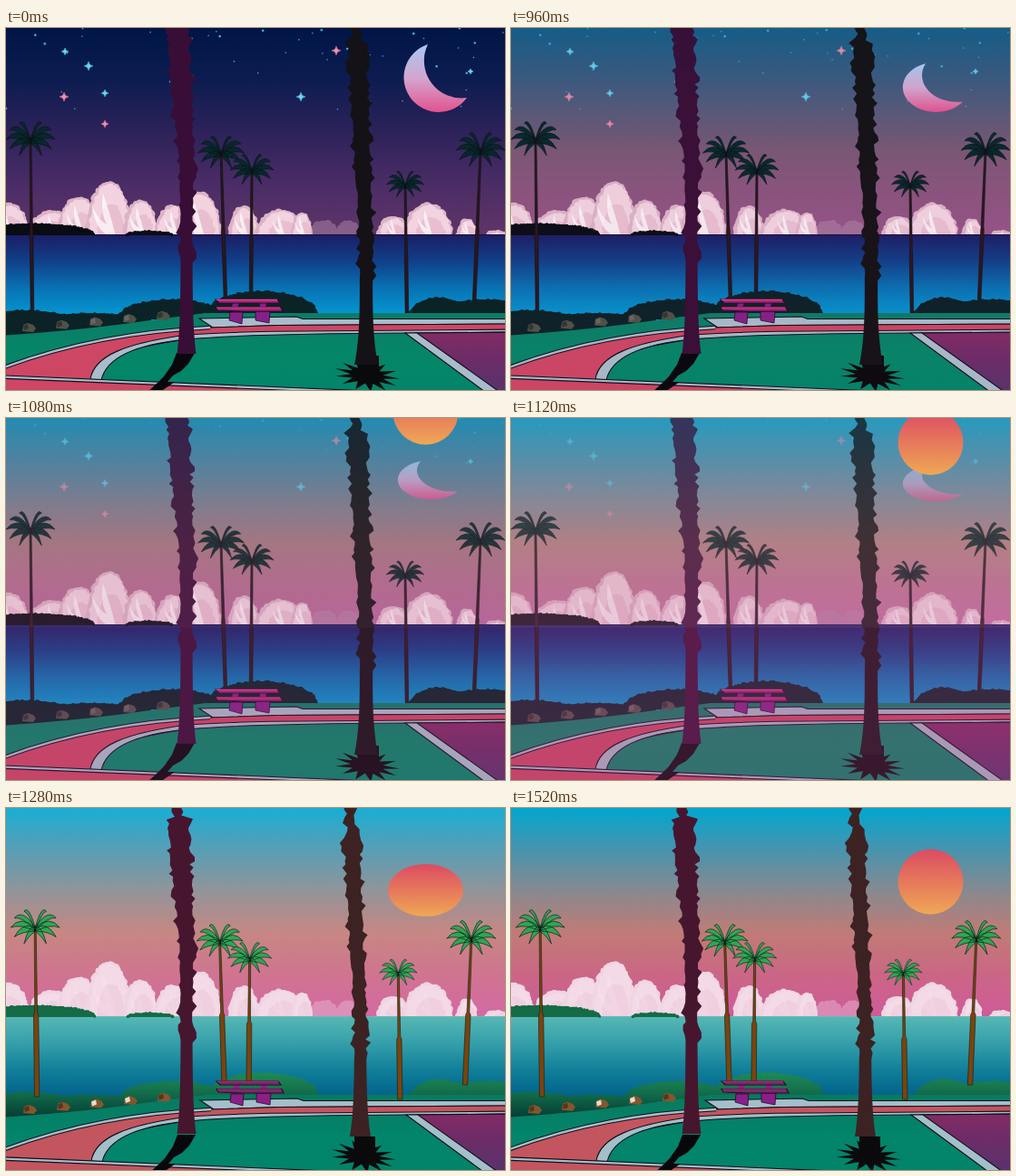
Animation of 550x400 px, one loop 2.8 s. Source, as an HTML page:

```html
<!DOCTYPE html>
<html lang="en">
<head>
<meta charset="utf-8">
<title>Night and day at the shore</title>
<style>
html, body { margin: 0; width: 100%; height: 100%; overflow: hidden; background: #000; }
svg { display: block; width: 100vw; height: 100vh; }
</style>
</head>
<body>
<svg id="stage" viewBox="0 0 550 400" preserveAspectRatio="none"></svg>
<script>
const stage = document.getElementById('stage');

let seed = 7;
const rnd = () => (seed = seed * 16807 % 2147483647) / 2147483647;
const loop = (n, f) => Array.from({ length: n }, (_, i) => f(i)).join('');

const path = (d, fill, extra = '') => `<path d="${d}" fill="${fill}" ${extra}/>`;
const group = (id, body) => `<g id="${id}">${body}</g>`;
const moved = (x, y, body) => `<g transform="translate(${x} ${y})">${body}</g>`;
const box = (y, h, fill) => `<rect x="-10" y="${y}" width="570" height="${h}" fill="${fill}"/>`;
const grad = (id, y1, y2, ...colors) =>
  `<linearGradient id="${id}" gradientUnits="userSpaceOnUse" x1="0" x2="0" y1="${y1}" y2="${y2}">` +
  colors.map((c, i) => `<stop offset="${i / (colors.length - 1)}" stop-color="${c}"/>`).join('') +
  '</linearGradient>';

// Half ellipse standing on its base, with small round bumps along its top
function mound([cx, w, base, h], r, fill) {
  let out = path(`M${cx - w} ${base}A${w} ${h} 0 0 1 ${cx + w} ${base}z`, fill);
  const n = Math.ceil((w + h) * 1.3 / r);
  out += loop(n, i => {
    const a = Math.PI * (i + rnd()) / n;
    return `<circle cx="${cx + (w - r * .6) * Math.cos(a)}" cy="${base - (h - r * .6) * Math.sin(a)}" r="${r * (.5 + rnd() * .6)}" fill="${fill}"/>`;
  });
  return out;
}

// Cloud heads: centre, half width, height
const heads = [[2, 24, 38], [50, 26, 30], [80, 24, 45], [113, 25, 62], [148, 19, 42], [185, 22, 36], [212, 25, 51],
  [262, 17, 35], [303, 28, 31], [326, 12, 28], [427, 18, 24], [465, 27, 38], [508, 11, 21], [542, 14, 8]];

function clouds(c) {
  return `<g opacity=".5">${mound([350, 16, 231, 18], 4, c.haze)}${mound([377, 14, 231, 18], 4, c.haze)}</g>` +
    heads.map(([x, w, h]) =>
      mound([x, w, 232, h], 4, c.rim) +
      mound([x + 1, w - 3, 232, h - 3], 4, c.cloud) +
      mound([x + 3, w * .6, 232, h * .6], 3, c.belly)).join('') +
    heads.map(([x, , h]) => path('M0 0Q-9 -3 -12 -22Q-7 -10 -1 -8Q-6 -15 -4 -30Q1 -16 5 0z', '#fff',
      `transform="translate(${x} 229) scale(${h / 40})" opacity="${c.swirl}"`)).join('');
}

// Crown of drooping leaves above a thin stem
const palms = [[27, 124, 29, 317, 56], [237, 139, 242, 302, 53], [271, 158, 270, 302, 50], [440, 174, 442, 320, 43], [523, 136, 516, 304, 56]];
function palm([x, y, foot, end, size], c) {
  const lean = v => v + c.palmShift[0] - v * c.palmShift[1];
  const x0 = lean(x), x1 = lean(foot), y0 = y + c.palmShift[2], y1 = end + c.palmShift[3];
  const xm = (x0 + x1) / 2, ym = (y0 + y1) / 2, w = c.knee;
  const stem = `M${x0 - 1} ${y0}L${xm - 1.4} ${ym}L${xm - w} ${ym + 3}L${x1 - w} ${y1}H${x1 + w}L${xm + w} ${ym + 3}L${xm + 1.4} ${ym}L${x0 + 1} ${y0}z`;
  const leaves = loop(10, i => {
    const a = -1.1 + .55 * (i >> 1), u = (i % 2 ? 27 : -27) * Math.cos(a), v = 20 * Math.sin(a);
    return `M0 0Q${u * .6} ${v - 8 - 6 * (1 + a)} ${u} ${v}Q${u * .6} ${v - 4 * (1 + a)} 0 4z`;
  });
  return path(stem, c.stem, `stroke="${c.line}" stroke-width=".6"`) +
    path(leaves, c.leaf, `stroke="${c.line}" stroke-width=".7" transform="translate(${x0} ${y0 - 1}) scale(${size / 56})"`);
}

// Leaning trunk with a narrow tip, torn sides above y = rough and a flared foot
function trunk({ x, bend, reach, tip, w, taper, flare, rough, end, fill }) {
  const side = s => {
    const pts = [];
    for (let y = -6; y < end; y += 3 + rnd() * 4) {
      const width = y < tip ? 9 : Math.max(13, w - y * taper) + flare * (y / end) ** 12;
      const torn = y < rough ? 6 * rnd() ** 2 - 1 : 0;
      pts.push(`${x + bend * Math.min(1, y / reach) + s * (width / 2 + torn)} ${y}`);
    }
    pts.push(`${x + bend + s * (13 + flare) / 2} ${end}`);
    return pts;
  };
  return path('M' + [...side(-1), ...side(1).reverse()].join('L') + 'z', fill);
}

function bench(c) {
  return path('M247 314H261L260 327L246 323zM275 313H291L290 326L275 323z', c.leg, 'stroke="#16051c" stroke-width=".7"') +
    path('M250 304H257L255 309H249zM280 304H287L286 309H280z', c.leg) +
    path('M231 300H299L302 304H235zM231 308.5H303L305 313H260L233 312z', c.wood, 'stroke="#2a0a30" stroke-width="1.2"') +
    path('M232 300.3H299M232 309H302', 'none', `stroke="${c.edge}" stroke-width="1.2"`);
}

function ground(c) {
  const ink = 'stroke="#100d18" stroke-width="1.1"';
  const rim = 'M-10 378Q95 337 225 331';
  return path('M-10 340Q60 336 130 327Q180 320 220 315H560V412H-10z', c.grass) +
    path('M213 321L320 319L327 321.5H560V327L300 328.5L228 331z', c.stone, ink) +
    path('M-10 379Q95 338 225 331L300 328.5L560 327V334L300 336Q130 344 103 373L94 389L-10 384z', c.road, ink) +
    path(rim, 'none', 'stroke="#100d18" stroke-width="4.4"') +
    path(rim, 'none', `stroke="${c.stone}" stroke-width="2.4"`) +
    path('M93 388C97 362 132 348 200 339Q260 335 330 335L560 333V336L440 337Q260 338 200 344C135 350 110 367 105 389z', c.stone, ink) +
    path('M452 337L560 336V412H552z', c.court, ink) +
    path('M440 337H453L548 405H532z', c.stone, ink) +
    path('M-10 386L330 401V412H-10z', c.road) +
    path('M-10 383.5L400 401H325L-10 387z', c.stone, ink);
}

const burst = 'M388 362H411V380H388z' + 'M' + Array.from({ length: 26 }, (_, i) => {
  const a = Math.PI * i / 13, r = i % 2 ? .5 : 1;
  return `${398 + 36 * r * Math.cos(a)} ${384 + 18 * r * Math.sin(a + .2)}`;
}).join('L') + 'z';

const bushes = [[20, 80, 340, 28], [95, 80, 335, 20], [183, 60, 322, 22], [282, 61, 316, 25], [477, 34, 321, 23], [530, 65, 321, 21]];
const isles = [[30, 68, 229, 13], [158, 26, 229, 5]];

function scene(c) {
  seed = 11;
  const trees = palms.map(p => palm(p, c)).join('');
  const mounds = (list, r, fill) => list.map(m => mound(m, r, fill)).join('');
  const rocks = loop(5, i => moved(25 + 37 * i, 331 - 3.3 * i,
    path('M-7 4L-6 -3L-1 -5L5 -3L8 1L5 5z', c.rock) + path('M-6 -2L-1 -4L0 1L-5 3z', i % 4 > 1 ? c.pale : c.rockDark)));
  const land = mounds(bushes, 3, c.bush) + ground(c) + rocks;
  return clouds(c) + box(c.sea, 110, `url(#${c.name}Sea)`) + box(c.sea, 1, c.horizon) +
    moved(...c.shift, mounds(isles, 2, c.isle)) +
    (c.front ? '' : trees) + moved(...c.shift, land) + (c.front ? trees : '') +
    moved(...c.shift, bench(c) +
      path('M188 359H208L201 371L193 379L184 384L178 391L186 391L170 402H156L167 392L174 385L183 372z', '#08070c')) +
    moved(...c.lean, path(burst, '#0a090c')) +
    trunk({ x: 189, bend: 10, reach: 150, w: 23, taper: .04, flare: 8, rough: 255, end: 360, ...c.left }) +
    trunk({ x: 386, bend: 11, reach: 230, w: 20, taper: .022, flare: 13, rough: 275, end: 372, ...c.right });
}

const night = {
  name: 'night', sea: 228, shift: [0, 0], lean: [0, 0], palmShift: [0, 0, 0, 0], knee: 1.8, horizon: '#11113f',
  rim: '#dcb3c6', cloud: '#f2d3df', belly: '#e9bfd0', haze: '#b08aa8', swirl: .7,
  leaf: '#07282b', stem: '#2c151d', line: '#0b1217', bush: '#0b2227', isle: '#0a0c14',
  grass: 'url(#nightGrass)', stone: '#a9bccb', road: '#cd4764', court: 'url(#court)',
  rock: '#4f5149', rockDark: '#30362f', pale: '#666760', wood: '#a52578', leg: '#842187', edge: '#f2428c',
  left: { tip: -9, fill: '#380e36' }, right: { tip: 14, fill: '#141216' }
};
const day = {
  name: 'day', sea: 230, front: true, shift: [1, 2], lean: [-4, 1], palmShift: [6, .031, 9, 2], knee: 2.7, horizon: '#6cb9b6',
  rim: '#efd5e2', cloud: '#f4dae6', belly: '#f0cfe0', haze: '#e6b6cf', swirl: .12,
  leaf: '#2fa653', stem: '#7c430e', line: '#0b1f19', bush: 'url(#dayBush)', isle: '#146b45',
  grass: 'url(#dayGrass)', stone: '#a3bfc9', road: '#c3555f', court: 'url(#court)',
  rock: '#84562f', rockDark: '#57351d', pale: '#e6ddd2', wood: '#7d2669', leg: '#8b1f88', edge: '#9b2f72',
  left: { tip: 12, fill: '#46162f' }, right: { x: 379.5, tip: 32, w: 18, flare: 10, end: 363, fill: '#3c2223' }
};

function stars() {
  const sparks = (fill, list) => list.map(([x, y, r]) =>
    moved(x, y, path(`M0 -${r}Q.5 -.5 ${r} 0Q.5 .5 0 ${r}Q-.5 .5 -${r} 0Q-.5 -.5 0 -${r}z`, fill, `stroke="${fill}" stroke-width=".5"`))).join('');
  return loop(50, i => `<circle cx="${550 * rnd()}" cy="${105 * rnd() ** 2}" r="${i % 3 ? .8 : 1.3}" fill="#3fa9d8"/>`) +
    sparks('#66d6f4', [[65, 26, 4], [91, 42, 5], [109, 72, 4], [325, 76, 5], [512, 48, 3]]) +
    sparks('#f28fa9', [[64, 76, 5], [109, 106, 4], [364, 25, 5]]);
}

stage.innerHTML = '<defs>' +
  grad('daySky', 0, 231, '#02a6cf', '#4794ae', '#88898f', '#c17b76', '#cb6686', '#cf5a9a') +
  grad('nightSky', 0, 228, '#001546', '#0d1c50', '#2c2259', '#4a2c66', '#5f3568') +
  grad('nightSea', 228, 318, '#1b1d63', '#10408a', '#0873b4', '#0597d2') +
  grad('daySea', 230, 322, '#57b8b4', '#349eaa', '#0f7d98', '#005f88') +
  grad('nightGrass', 318, 400, '#0b7c67', '#058668', '#028569') +
  grad('dayGrass', 318, 400, '#087a60', '#02856b', '#028469') +
  grad('dayBush', 290, 338, '#1d8b56', '#126b4a', '#063f35') +
  grad('court', 334, 400, '#842b65', '#6b2c67', '#58336c') +
  grad('moonFill', -37, 38, '#a9c8f0', '#d3a6cf', '#e3528f') +
  grad('sunFill', -36, 36, '#dc4b63', '#e6785c', '#efa855') +
  '</defs>' +
  box(0, 232, 'url(#daySky)') + box(231, 175, '#c0438a') +
  group('glow', box(0, 232, '#fff')) +
  group('dark', box(0, 400, 'url(#nightSky)')) +
  group('stars', stars()) +
  group('moon', path('M-12 -37A38.4 38.4 0 1 0 31 22A41.3 41.3 0 0 1 -12 -37z', 'url(#moonFill)')) +
  group('sun', '<circle r="36" fill="url(#sunFill)"/>') +
  group('night', scene(night)) + group('day', scene(day));

const el = id => document.getElementById(id);
const fade = (id, value) => el(id).setAttribute('opacity', value);
const place = (id, x, y, sx, sy) => el(id).setAttribute('transform', `translate(${x} ${y}) scale(${sx} ${sy})`);
const part = (t, from, to) => Math.min(1, Math.max(0, (t - from) / (to - from)));
const mix = (a, b, u) => a + (b - a) * u;

function draw(now) {
  const t = Math.floor(now % 2800 / 40) * 40;
  const dusk = part(t, 800, 1200);
  fade('dark', (1 - dusk) ** .9 * (1 - dusk * .3));
  fade('stars', 1 - dusk ** 2.5);
  fade('moon', 1 - dusk ** 4);
  fade('night', 1 - .55 * dusk ** 3);
  fade('glow', .18 * (1 - part(t, 1200, 1360)));
  el('night').style.display = t < 1200 ? '' : 'none';
  el('day').style.display = t < 1200 ? 'none' : '';

  // The moon jumps, flattens, then sinks under the sun
  if (t < 800) place('moon', 477, 55, 1, 1);
  else place('moon', 468.4, mix(68, 64.6, part(t, 800, 1040)) + 16 * part(t, 1040, 1200), .95, mix(.95, .42, dusk ** .9));

  // The sun drops in, flattens on landing, then rounds out
  const squash = t < 1200 ? 0 : 1 - part(t, 1400, 1520);
  const y = t < 1200 ? mix(-40, 94, part(t, 1040, 1200)) : mix(94, 81.5, part(t, 1200, 1520));
  place('sun', 462.5, y, 1 + .15 * squash, 1 - .195 * squash);
  requestAnimationFrame(() => draw(performance.now() - start));
}
const start = performance.now();
draw(0);
</script>
</body>
</html>
```
